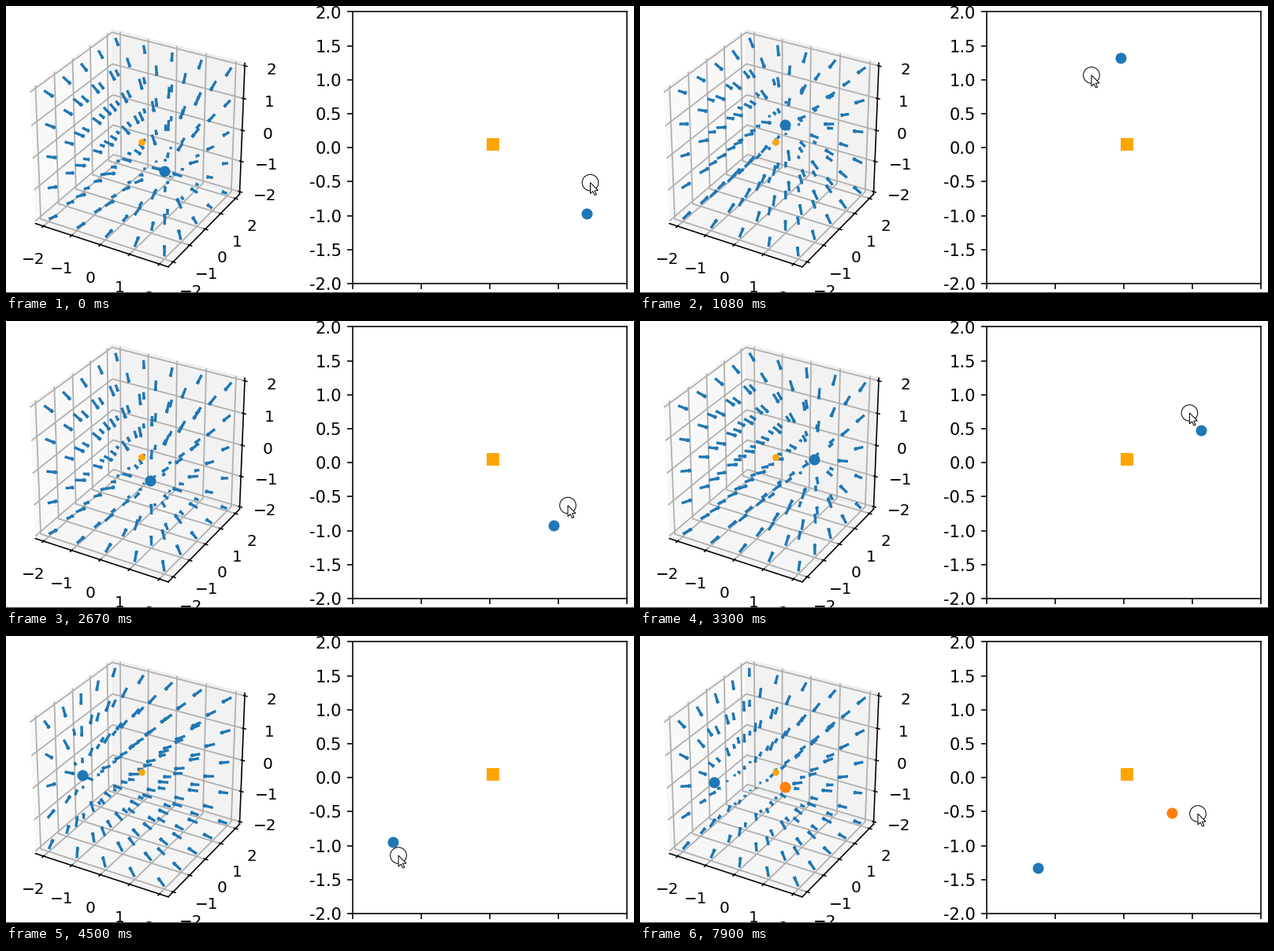
A matplotlib script for the animation above (8000 ms loop, 797x365 px).

```python
import numpy as np
import matplotlib.pyplot as plt
from matplotlib.animation import FuncAnimation
from matplotlib.patches import Circle, Polygon

W, H, DPI = 797, 365, 144
TICK = 40            # ms per drawn frame
LOOP = 8000
LAG = 120            # a dragged dot trails the pointer by this many ms
DROP, GONE, ADD, BACK, GRAB = 4860, 5220, 6090, 6460, 7300

# Bursts of picture updates: start and number, 120 ms apart
BURSTS = [(0, 11), (1350, 16), (3300, 17), (ADD, 1), (BACK, 13)]
STEPS = np.concatenate([start + LAG * np.arange(n) for start, n in BURSTS])

BOX = (440, 7.5, 788, 353)       # left, top, right, bottom of the flat plot
HOME = np.array([614.0, 180.5])  # its origin in pixels

# Circling of the pointer: time in ms, angle in degrees, radius in pixels
HUB = np.array([612.0, 180.0])
TURN = np.array([(-120, -34, 151), (0, -19, 137), (960, 91, 114),
                 (1080, 113, 100), (2610, 324, 115), (3660, 461, 106),
                 (3780, 492, 108), (4440, 578, 149), (4740, 587, 157)], float)
TIMES, POLAR = TURN[:, 0], TURN[:, 1:]
SLOPES = np.gradient(POLAR, TIMES, axis=0)


def circling(t):
    """Hermite curve through the polar keys, as a pixel position."""
    t = np.clip(t, TIMES[0], TIMES[-1])
    k = min(np.searchsorted(TIMES, t, side="right") - 1, len(TIMES) - 2)
    h = TIMES[k + 1] - TIMES[k]
    s = (t - TIMES[k]) / h
    angle, radius = (
        (1 + 2 * s) * (1 - s) ** 2 * POLAR[k]
        + s * (1 - s) ** 2 * h * SLOPES[k]
        + s * s * (3 - 2 * s) * POLAR[k + 1]
        - s * s * (1 - s) * h * SLOPES[k + 1])
    a = np.radians(angle)
    return HUB + radius * np.array([np.cos(a), -np.sin(a)])


def phase(t, start, end):
    return np.clip((t - start) / (end - start), 0, 1)


def second_visit(t):
    """Ease in to the plot's centre, then pull away to the lower right."""
    enter, catch = np.array([769, 87]), np.array([624, 190])
    near = 1 - (1 - phase(t, BACK, 7180)) ** 1.5
    s = phase(t, GRAB, 7900)
    pull = np.array([84 * s ** 2.2, 36 * (1 - (1 - s) ** 2)])
    return enter + (catch - enter) * near + pull


def pointer(t):
    if t < GONE:
        rest = circling(t)
        return rest + (np.array([599, 75]) - rest) * phase(t, DROP, 5100)
    return second_visit(t) if t >= BACK else None


def to_data(p):
    return (p - HOME) / (87, -86.3)


def drag(path, t):
    """Flat position (pixels) and 3D position (data) of a dragged dot."""
    # The 3D view refreshes sooner while the pointer is high
    lag = 97 - 40 * np.tanh(2 * to_data(path(t))[1])
    return path(t - LAG), to_data(path(t - lag))


def rect(left, top, right, bottom):
    return [left / W, 1 - bottom / H, (right - left) / W, (bottom - top) / H]


plt.rcParams["grid.linewidth"] = 0.9
fig = plt.figure(figsize=((W + 1e-3) / DPI, (H + 1e-3) / DPI), dpi=DPI,
                 facecolor="white")

# 3D view
side = BOX[3] - BOX[1]
left = 169 - side * 0.95 / 1.85
space = fig.add_axes(rect(left, BOX[1], left + side, BOX[3]),
                     projection="3d", computed_zorder=False)
space.patch.set_visible(False)
space.set_box_aspect((1, 1, 1), zoom=np.sqrt(3) / 1.8294640721620434)
space.view_init(elev=30, azim=-60)
wide, tall = 2.2 * 25 / 24, 2 * 25 / 24
space.set(xlim=(-wide, wide), ylim=(-wide, wide), zlim=(-tall, tall))
for axis in (space.xaxis, space.yaxis, space.zaxis):
    axis.set_ticks(range(-2, 3))

grid = np.array(np.meshgrid(*[np.arange(-2.0, 3.0)] * 3)).reshape(3, -1)
blue3d, = space.plot([0], [0], [0], "o", color="C0", zorder=4)
orange3d, = space.plot([0], [0], [0], "o", color="C1", zorder=4)
space.scatter([0.05], [0.05], [0.05], s=11, color="orange",
              depthshade=False, zorder=5)

# Flat view
flat = fig.add_axes(rect(*BOX))
flat.set(xlim=(-2, 2), ylim=(-2, 2), xticks=range(-2, 3),
         yticks=np.arange(-2, 2.1, 0.5))
flat.yaxis.set_major_formatter(lambda v, pos: f"{v:.1f}")
flat.tick_params(labelbottom=False, labelsize=10.5)

# Pixel layer for the dots, the pointer and the window edge
top = fig.add_axes([0, 0, 1, 1], zorder=10)
top.set(xlim=(0, W), ylim=(H, 0))
top.axis("off")
top.plot([0, W], [364, 364], color="#4a4a4a", lw=0.5)
top.plot([618], [176], "s", color="#d9c493", ms=7.4, mew=1)
top.plot([618], [176], "s", color="orange", ms=6.6, mew=1)
blue, = top.plot([0], [0], "o", color="C0")
orange, = top.plot([0], [0], "o", color="C1")

ARROW = np.array([(0, 0), (0, 14), (3.2, 11), (5.6, 16), (7.8, 15),
                  (5.4, 10.2), (10, 10)])
ring = top.add_patch(Circle((0, 0), 10.3, fill=False, ec="black", lw=0.5,
                            zorder=6))
arrow = top.add_patch(Polygon(ARROW, fc="white", ec="black", lw=0.5, zorder=7))

shown = {"step": None, "field": None}


def draw_field(dots):
    """Each arrow is the mean of the unit vectors towards the dots."""
    if shown["field"] is not None:
        shown["field"].remove()
    pull = 0
    for x, y in dots:
        way = np.array([[x], [y], [0]]) - grid
        pull = pull + way / np.maximum(np.linalg.norm(way, axis=0), 1e-9)
    shown["field"] = space.quiver(*grid, *(pull / len(dots)), length=0.31,
                                  color="C0", lw=1.7, zorder=2)


def place(dot2d, dot3d, pixel, data):
    dot2d.set_data([pixel[0]], [pixel[1]])
    dot3d.set_data_3d([data[0]], [data[1]], [0])


def update(i):
    now = i * TICK + TICK - 1
    t = STEPS[np.searchsorted(STEPS, now, side="right") - 1]
    if t == shown["step"]:
        return
    shown["step"] = t

    pixel, data = drag(circling, min(t, DROP))
    place(blue, blue3d, pixel, data)
    dots = [data]

    pixel, data = drag(second_visit, t) if t > GRAB else (HOME, (0, 0))
    place(orange, orange3d, pixel, data)
    for dot in (orange, orange3d):
        dot.set_visible(t >= ADD)
    if t >= ADD:
        dots.append(data)
    draw_field(dots)

    tip = pointer(t)
    for part in (ring, arrow):
        part.set_visible(tip is not None)
    if tip is not None:
        ring.center = tuple(tip)
        arrow.set_xy(ARROW + tip)


def start():
    shown["step"] = None
    update(0)


anim = FuncAnimation(fig, update, frames=LOOP // TICK, init_func=start,
                     interval=TICK, repeat=True, repeat_delay=0, blit=False)
plt.show()
```
